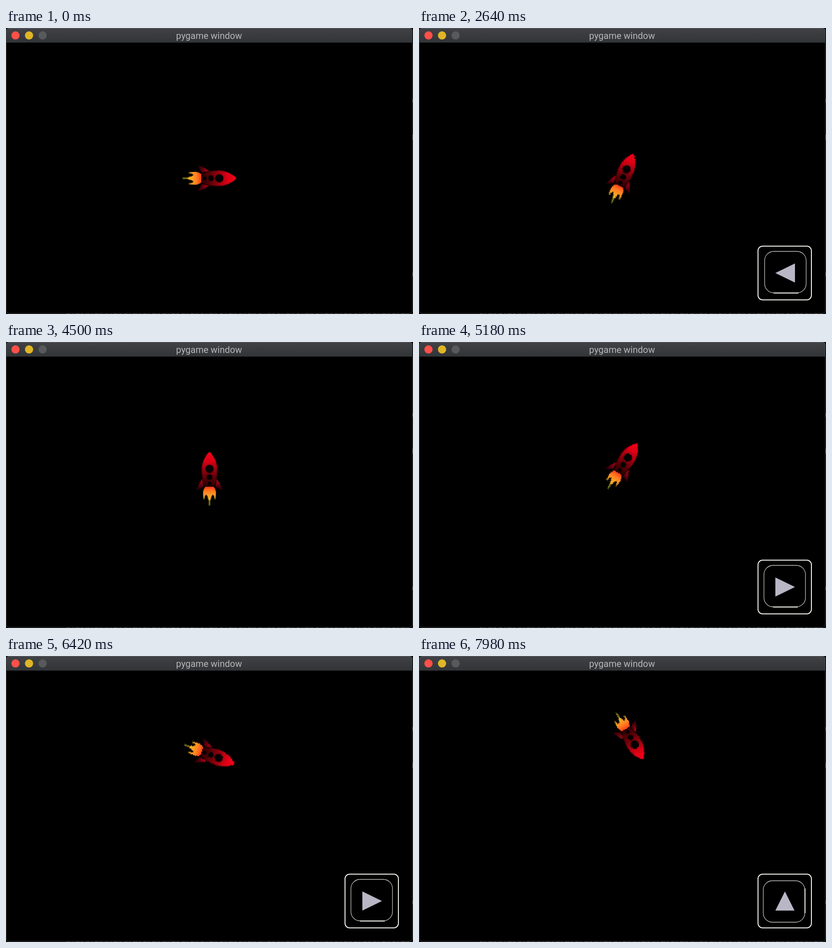
An HTML page with a canvas for the animation above (8000 ms loop, 892 px wide and 628 px high).

```html
<!DOCTYPE html>
<html lang="en">
<head>
<meta charset="utf-8">
<title>pygame window</title>
<style>
  html, body { margin: 0; width: 100%; height: 100%; overflow: hidden; background: #000; }
  svg, canvas { position: absolute; left: 0; top: 0; width: 892px; height: 628px; }
  canvas { image-rendering: pixelated; }
  text { font: 20px Roboto, Arial, sans-serif; fill: #b6b7b8; }
</style>
</head>
<body>
<svg viewBox="0 0 892 628">
  <defs>
    <linearGradient id="bar" x2="0" y2="1">
      <stop offset="0" stop-color="#404246"/>
      <stop offset="1" stop-color="#323538"/>
    </linearGradient>
  </defs>
  <rect width="892" height="628"/>
  <path d="M133 627.5H892" stroke="#3c3c3c" stroke-dasharray="7 4 3 5 9 3 5 6"/>
  <path d="M891.5 156v8M891.5 234v12M891.5 537v8" stroke="#555"/>
  <path d="M0 32V6Q0 0 6 0H885Q891 0 891 6V32Z" fill="url(#bar)"/>
  <path d="M5 .5H886" stroke="#62656c"/>
  <path d="M.5 32V620Q.5 626.5 7 626.5H884Q890.5 626.5 890.5 620V32" fill="none" stroke="#424345"/>
  <circle cx="20.8" cy="16.3" r="9" fill="#ff5048"/>
  <circle cx="50.5" cy="16.3" r="9" fill="#e0b526"/>
  <circle cx="80.2" cy="16.3" r="9" fill="#58595b"/>
  <text x="445" y="23.5" text-anchor="middle">pygame window</text>
  <g id="key" fill="none">
    <rect x="743" y="479" width="117" height="118" rx="10" stroke="#f4f4ee" stroke-width="2"/>
    <g id="cap">
      <rect width="91" height="91" rx="20" stroke="#c4c4c0" stroke-width="1.3"/>
      <path d="M20 91.5H74" stroke="#f0f0e8" stroke-width="2"/>
    </g>
    <path id="arrow" fill="#b9b7c6"/>
  </g>
</svg>
<canvas id="stage" width="446" height="314"></canvas>
<script>
const LOOP = 8000;
const TURN = 3;
const THRUST = 0.21;

// Key presses as [key, first step, last step].
const PRESSES = [
  ['left', 36, 65],
  ['up', 81, 90],
  ['right', 102, 151],
  ['up', 155, 999]
];
const FIRST_SHOWN = 37;

const KEYS = {
  left:  { cap: 'translate(757.5 490.5)', arrow: 'M781 538L824 517V559Z' },
  right: { cap: 'translate(756 490.5)', arrow: 'M824 538L781 517V559Z' },
  up:    { cap: 'translate(754.5 584.5) rotate(-90)', arrow: 'M802 517L781 559H823Z' }
};

const $ = id => document.getElementById(id);
const ctx = $('stage').getContext('2d');
const sprite = makeRocket();

function gradient(c, y0, y1, colors) {
  const g = c.createLinearGradient(0, y0, 0, y1);
  colors.forEach((color, i) => g.addColorStop(i / (colors.length - 1), color));
  return g;
}

// The rocket points up, centred in a 64 px square.
function makeRocket() {
  const canvas = document.createElement('canvas');
  canvas.width = canvas.height = 64;
  const c = canvas.getContext('2d');
  c.translate(32, 32);
  c.scale(0.5, 0.5);
  const fill = (d, style) => {
    c.fillStyle = style;
    c.fill(new Path2D(d));
  };

  const fin = gradient(c, 0, 27, ['#d80018', '#680010', '#100000']);
  fill('M16 1Q24 11 29 27Q23 23 13 17Z', fin);
  fill('M-16 1Q-24 11 -29 27Q-23 23 -13 17Z', fin);

  fill('M-9 18H9Q15 25 14 34L13 45L11 45Q11 37 7 35Q4 38 3 45L1 48V59H-1V48L-3 45' +
       'Q-4 38 -7 35Q-11 37 -11 45L-13 45L-14 34Q-15 25 -9 18Z',
       gradient(c, 18, 58, ['#ff4018', '#ff7c20', '#ffa024', '#e8c028', '#c0cc38']));

  fill('M0 -59C10 -50 17 -34 17 -20C17 -5 14 8 10 18H-10C-14 8 -17 -5 -17 -20C-17 -34 -10 -50 0 -59Z',
       gradient(c, -59, 20, ['#ff0018', '#dc0015', '#98000e', '#540007', '#200001']));

  for (const [y, r] of [[-21.5, 9], [-3.5, 6.2], [10.5, 4]]) {
    c.fillStyle = '#000';
    c.beginPath();
    c.arc(0, y, r, 0, 7);
    c.fill();
  }
  return canvas;
}

// Steps come in threes, lasting 20, 20 and 100 ms.
function stepAt(t) {
  const u = t + 20, r = u % 140;
  return Math.floor(u / 140) * 3 + (r < 20 ? 0 : r < 40 ? 1 : 2);
}

function keyAt(step) {
  const press = PRESSES.find(([, from, to]) => step >= from && step <= to);
  return press && press[0];
}

function simulate(step) {
  const s = { x: 446, y: 330, vx: 0, vy: 0, angle: 0 };
  if (step < FIRST_SHOWN) return s;
  for (let i = 1; i <= step; i++) {
    const key = keyAt(i);
    if (key === 'left') s.angle += TURN;
    if (key === 'right') s.angle -= TURN;
    if (key === 'up') {
      const a = s.angle * Math.PI / 180;
      s.vx += THRUST * Math.cos(a);
      s.vy -= THRUST * Math.sin(a);
    }
    s.x += s.vx;
    s.y += s.vy;
  }
  return s;
}

// Half resolution, on whole pixels.
function drawRocket(s) {
  ctx.setTransform(1, 0, 0, 1, 0, 0);
  ctx.clearRect(0, 0, 446, 314);
  ctx.imageSmoothingEnabled = false;
  ctx.translate(Math.floor(s.x / 2), Math.floor(s.y / 2));
  ctx.rotate((90 - s.angle) * Math.PI / 180);
  ctx.drawImage(sprite, -32, -32);
}

function drawKey(name) {
  $('key').style.display = name ? '' : 'none';
  if (!name) return;
  const { cap, arrow } = KEYS[name];
  $('cap').setAttribute('transform', cap);
  $('arrow').setAttribute('d', arrow);
}

let shown = -1;
const start = performance.now();

function frame() {
  const step = stepAt((performance.now() - start) % LOOP);
  if (step !== shown) {
    shown = step;
    drawRocket(simulate(step));
    drawKey(step < FIRST_SHOWN ? null : keyAt(step));
  }
  requestAnimationFrame(frame);
}
frame();
</script>
</body>
</html>
```
